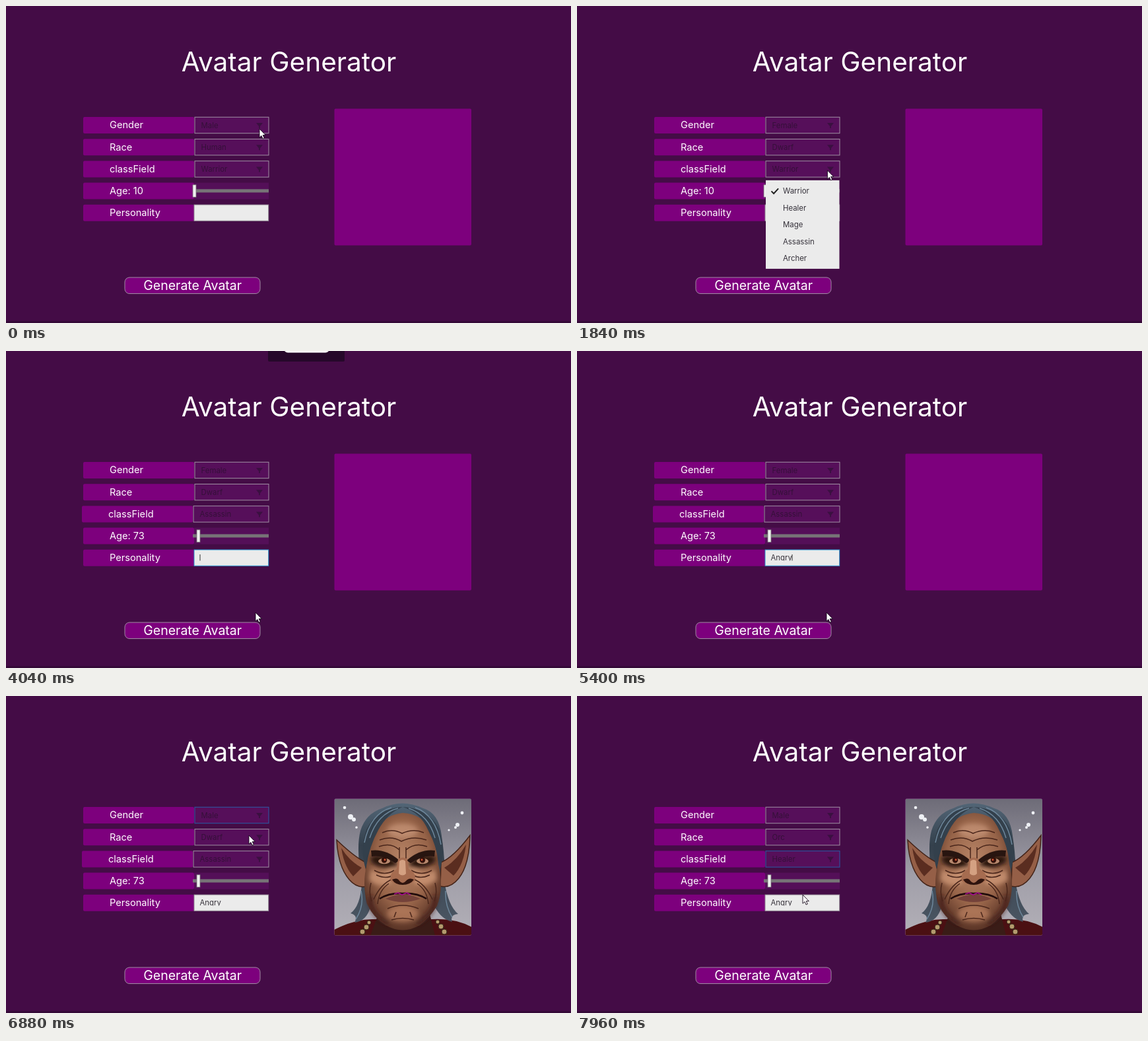
Write an HTML page that moves like this. It is 856x480 px and loops after 8000 ms.

```html
<!DOCTYPE html>
<html lang="en">
<head>
<meta charset="utf-8">
<title>Avatar Generator</title>
<style>
html, body { margin: 0; width: 100%; height: 100%; overflow: hidden; background: #440c46; }
svg { display: block; width: 856px; height: 480px; font: 14.6px Inter, sans-serif; }
.small { font-size: 11.4px; }
</style>
</head>
<body>
<svg viewBox="0 0 856 480">
  <defs>
    <linearGradient id="sky" x2="0" y2="1">
      <stop stop-color="#6d6b77"/><stop offset=".55" stop-color="#a09ea8"/><stop offset="1" stop-color="#b3b0b8"/>
    </linearGradient>
    <radialGradient id="skin" cy=".42" r=".6">
      <stop stop-color="#b98668"/><stop offset=".6" stop-color="#976449"/><stop offset="1" stop-color="#553023"/>
    </radialGradient>
    <linearGradient id="hair" x2="0" y2="1">
      <stop stop-color="#526576"/><stop offset=".35" stop-color="#34404c"/><stop offset="1" stop-color="#4a5562"/>
    </linearGradient>
    <filter id="soft"><feGaussianBlur stdDeviation=".7"/></filter>
    <filter id="blur"><feGaussianBlur stdDeviation="3"/></filter>
    <clipPath id="frame"><rect x="497.5" y="155.5" width="207.5" height="207" rx="2"/></clipPath>
    <clipPath id="line"><rect x="288" y="303" width="107" height="14.5"/></clipPath>
  </defs>
  <rect width="856" height="480" fill="#440c46"/>
  <rect y="477" width="856" height="3" fill="#350a38"/>
  <text x="428.5" y="98.5" font-size="40.6" fill="#fff" text-anchor="middle">Avatar Generator</text>
  <rect x="497.5" y="155.5" width="207.5" height="207" rx="2" fill="#7d007d"/>
  <rect x="180" y="411" width="205" height="24.5" rx="7" fill="#7d007d" stroke="#a08ba2"/>
  <text x="282.7" y="430.3" font-size="19.5" fill="#fff" text-anchor="middle">Generate Avatar</text>

  <g id="portrait" clip-path="url(#frame)">
    <rect x="497" y="155" width="209" height="208" fill="url(#sky)"/>
    <g filter="url(#soft)">
      <g fill="#eef0f4">
        <circle cx="513" cy="169" r="2.3"/><circle cx="522" cy="183" r="4"/><circle cx="527" cy="187" r="3"/>
        <circle cx="531" cy="199" r="1.8"/><circle cx="691" cy="177" r="2.4"/><circle cx="684" cy="195" r="3"/>
        <circle cx="681" cy="199" r="2"/><circle cx="671" cy="203" r="1.6"/>
      </g>
      <path d="M497 363V354Q530 337 558 338H645Q680 336 706 350V363Z" fill="#4b1013"/>
      <path d="M570 170Q600 155 632 170Q656 177 660 212Q666 250 664 280Q670 318 685 330Q672 331 676 342Q660 338 650 320H552Q546 341 528 343Q534 332 522 329Q537 318 539 284Q530 230 537 204Q545 178 570 170Z" fill="url(#hair)"/>
      <path id="earL" d="M545 252Q528 244 501 218Q503 258 520 278Q532 292 547 288Z" fill="#955f47" stroke="#432318" stroke-width="1.5"/>
      <path d="M659 252Q678 244 703 211Q702 256 686 276Q673 292 658 288Z" fill="#955f47" stroke="#432318" stroke-width="1.5"/>
      <path d="M539 260Q520 250 508 230Q512 258 526 273ZM664 260Q683 249 697 225Q693 257 678 272Z" fill="#5a2d20"/>
      <path d="M564 330H642L650 363H552Z" fill="#3a1c17"/>
      <path d="M566 198Q575 180 601 177Q630 179 638 198Q653 225 655 255Q664 290 653 318Q640 338 627 347Q601 362 575 347Q556 335 547 315Q539 285 547 253Q550 220 566 198Z" fill="url(#skin)"/>
      <path d="M601 168Q578 177 564 203Q550 228 545 262Q536 235 546 202Q562 170 601 168ZM601 168Q628 176 640 204Q654 230 658 262Q666 232 655 200Q640 170 601 168Z" fill="#33404c"/>
      <g fill="none" stroke="#6d869a" stroke-width="1.5">
        <path d="M594 170Q563 178 551 215M584 169Q552 178 543 222M610 170Q640 180 650 215M620 169Q651 180 659 225M538 295Q543 318 530 338M666 295Q665 318 676 335"/>
      </g>
      <g filter="url(#blur)">
        <path d="M553 262Q572 276 588 258L583 285Q560 290 550 278ZM614 258Q632 276 650 262L653 278Q640 290 619 285Z" fill="#d09a79" opacity=".75"/>
        <path d="M552 243Q575 235 594 254L588 259Q566 263 553 252ZM610 254Q628 235 651 243L650 252Q636 263 614 259Z" fill="#2b120c"/>
        <ellipse cx="601" cy="204" rx="23" ry="11" fill="#c89679" opacity=".7"/>
        <ellipse cx="601" cy="330" rx="24" ry="12" fill="#bb8060" opacity=".7"/>
        <path d="M553 302Q548 328 580 345M650 302Q652 328 622 345" fill="none" stroke="#40201a" stroke-width="7" opacity=".7"/>
      </g>
      <g fill="none" stroke="#4a261b" stroke-width="1.5">
        <path d="M570 207Q585 200 600 208Q618 200 633 207M566 218Q584 211 599 220Q617 211 637 218M565 228Q583 221 596 233M638 228Q620 221 606 233M596 229V246M606 229V246"/>
        <path d="M558 264Q574 273 588 264M561 271Q576 278 587 271M614 264Q630 273 645 264M616 271Q628 278 642 271"/>
        <path d="M586 277Q568 284 557 308M617 277Q635 284 646 308M580 284Q565 294 563 315M623 284Q638 294 640 315M553 283Q549 297 554 311M650 283Q654 297 649 311"/>
        <path d="M578 322Q601 312 625 322M584 339Q601 334 618 339M591 327L588 335M612 327L615 335"/>
      </g>
      <path d="M553 234Q575 231 596 249L590 253Q571 240 554 243ZM650 234Q628 231 607 249L613 253Q632 240 649 243Z" fill="#281510"/>
      <g fill="#b7886d"><ellipse cx="573" cy="250" rx="9" ry="4.3"/><ellipse cx="631" cy="250" rx="9" ry="4.3"/></g>
      <g fill="#341009"><circle cx="573" cy="248.5" r="4.2"/><circle cx="631" cy="248.5" r="4.2"/></g>
      <g fill="#d85938"><circle cx="574" cy="248" r="1.4"/><circle cx="630" cy="248" r="1.4"/></g>
      <path d="M594 247Q601 242 608 247L610 262Q623 268 619 280Q611 286 601 285Q590 286 583 280Q580 268 592 262Z" fill="#a66c50"/>
      <path d="M596 250Q601 246 605 250L606 269Q601 274 595 269Z" fill="#d4a182"/>
      <path d="M585 278Q593 274 596 280Q601 286 606 280Q611 274 618 278Q612 286 601 286Q590 286 585 278Z" fill="#2f140e"/>
      <path d="M575 307Q601 294 628 307Q601 317 575 307Z" fill="#74423a"/>
      <path d="M566 307Q580 298 601 299Q623 298 637 307" fill="none" stroke="#210c0b" stroke-width="2.6"/>
      <path d="M588 300L594 298 600 301 607 298 613 301" fill="none" stroke="#a20d8d" stroke-width="1.8"/>
      <g fill="#b49a6d" stroke="#352819">
        <circle cx="550" cy="343" r="3"/><circle cx="546" cy="350" r="4"/><circle cx="540" cy="357" r="4"/>
        <circle cx="654" cy="342" r="3"/><circle cx="659" cy="349" r="4"/><circle cx="664" cy="357" r="4"/>
      </g>
    </g>
  </g>
  <g id="form"></g>
  <g id="overlay">
    <rect x="397" y="-34" width="116" height="50" rx="2" fill="#26082a"/>
    <rect x="421" y="-22" width="69" height="24.5" rx="6" fill="#fff"/>
  </g>
  <path id="cursor" d="M0 0V13.2L3 10.5 5.1 15 7.3 14 5.2 9.6H9.3Z" fill="#fff" stroke="#16081a" stroke-width=".9"/>
</svg>
<script>
const LOOP = 8000;
const options = [
  ['Male', 'Female'],
  ['Human', 'Orc', 'Elf', 'Dwarf', 'Monster'],
  ['Warrior', 'Healer', 'Mage', 'Assassin', 'Archer'],
];
// Each list holds [time, value] pairs; a value stays until the next one.
const picks = [
  [[0, 0], [720, 1], [6800, 0]],
  [[0, 0], [1440, 3], [7280, 1]],
  [[0, 0], [2280, 3], [7640, 1]],
];
const openMenu = [[0, -1], [280, 0], [720, -1], [960, 1], [1440, -1], [1760, 2], [2280, -1],
  [6600, 0], [6800, -1], [7000, 1], [7280, -1], [7400, 2], [7640, -1]];
const focusRow = [[0, -1], [720, 0], [960, -1], [1440, 1], [1760, -1], [2280, 2], [2760, -1],
  [3440, 4], [6120, -1], [6800, 0], [7000, -1], [7280, 1], [7400, -1], [7640, 2]];
const typed = [[0, 0], [4200, 1], [4320, 2], [4440, 3], [5160, 4], [5400, 5]];
const caretOn = [[0, 0], [3440, 1], [4880, 0], [5160, 1], [6120, 0]];
const path = [[0, 384, 186], [440, 384, 186], [680, 374, 235], [760, 374, 235], [920, 383, 208],
  [1000, 383, 208], [1080, 382, 234], [1360, 366, 320], [1440, 366, 320], [1720, 380, 245],
  [1800, 380, 245], [2160, 364, 353], [2280, 364, 353], [2520, 354, 296], [2760, 286, 280],
  [2800, 286, 280], [3040, 292, 280], [3200, 292, 280], [3400, 340, 312], [3480, 340, 312],
  [3880, 378, 396], [5840, 378, 396], [6080, 340, 430], [6200, 340, 430], [6520, 378, 181],
  [6600, 378, 181], [6760, 368, 211], [7000, 368, 211], [7220, 360, 270], [7280, 360, 270],
  [7380, 372, 244], [7420, 372, 244], [7600, 344, 302], [7960, 342, 301]];

const $ = id => document.getElementById(id);
const rowY = i => 168 + i * 33.2;
const clamp = v => Math.min(1, Math.max(0, v));
const ease = v => v * v * (3 - 2 * v);
const at = (list, t) => list.filter(e => e[0] <= t).pop()[1];

const rect = (x, y, w, h, fill, more = '') =>
  `<rect x="${x}" y="${y}" width="${w}" height="${h}" fill="${fill}" ${more}/>`;
const text = (x, y, s, fill = '#fff', more = '') =>
  `<text x="${x}" y="${y}" fill="${fill}" ${more}>${s}</text>`;
const small = (x, y, s, fill, more = '') => text(x, y, s, fill, 'class="small" ' + more);

function label(i, s, shift) {
  return rect(117 - shift, rowY(i), 168, 25, '#7d007d', 'rx="2"') + text(157 - shift, rowY(i) + 17.3, s);
}

function select(i, name, pick, focused, shift) {
  const y = rowY(i), x = 286 - shift;
  return label(i, name, shift)
    + rect(x, y + .3, 398 - x, 24.4, '#560f5a', `stroke="${focused ? '#2b5aa6' : '#a08fa3'}"`)
    + small(x + 9.5, y + 16.7, options[i][pick], '#351039')
    + `<path d="M379 ${y + 9}h10l-4 5v3h-2v-3z" fill="#3a1040"/>`;
}

function menu(i, pick) {
  const top = rowY(i) + 29.5, items = options[i];
  return rect(286, top, 111.5, items.length * 25.5 + 6.5, '#ebebeb')
    + items.map((s, k) => small(312, top + 20.3 + k * 25.5, s, '#35313a')).join('')
    + `<path d="M294.5 ${top + 16.5 + pick * 25.5}l3.6 3.6 7-7.6" fill="none" stroke="#222" stroke-width="2"/>`;
}

function slider(p) {
  return label(3, 'Age: ' + Math.round(10 + 63 * p), 0)
    + rect(285, rowY(3), 113, 25, '#540f58')
    + rect(285 - 2 * p, rowY(3) + 9.8, 113 + 2 * p, 5, '#777477')
    + rect(283 + 6 * p, rowY(3) + 3.2, 5, 18.5, '#f0f0f0', 'stroke="#777" stroke-width=".8"');
}

function field(t, focused) {
  const n = at(typed, t), caretX = 293.5 + [0, 7.8, 14.5, 21.5, 25.6, 32][n];
  return label(4, 'Personality', 0)
    + rect(285, rowY(4) + .2, 112.7, 24.3, '#ebebeb', `stroke="${focused ? '#2b96cf' : '#938b95'}"`)
    + small(293.5, 317, 'Angry'.slice(0, n), '#38343c', 'clip-path="url(#line)"')
    + (at(caretOn, t) ? rect(caretX, 308, 1, 9.5, '#333') : '');
}

function moveCursor(t) {
  const k = path.findIndex(p => p[0] > t);
  const b = path[k < 0 ? path.length - 1 : k], a = path[k < 0 ? path.length - 1 : k - 1];
  const p = ease(clamp((t - a[0]) / (b[0] - a[0] || 1)));
  $('cursor').setAttribute('transform', `translate(${a[1] + (b[1] - a[1]) * p} ${a[2] + (b[2] - a[2]) * p})`);
}

function draw(now) {
  const t = now % LOOP, focus = at(focusRow, t), open = at(openMenu, t);
  const pick = picks.map(list => at(list, t));
  $('form').innerHTML = ['Gender', 'Race', 'classField']
      .map((s, i) => select(i, s, pick[i], focus === i, i === 2 && pick[2] === 3 ? 2 : 0)).join('')
    + slider(ease(clamp((t - 2800) / 240)))
    + field(t, focus === 4)
    + (open < 0 ? '' : menu(open, pick[open]));
  $('portrait').style.display = t < 6160 ? 'none' : '';
  $('overlay').style.display = t >= 4040 && t < 4200 ? '' : 'none';
  $('overlay').setAttribute('transform', `translate(0 ${-16 * clamp((t - 4080) / 120)})`);
  moveCursor(t);
}

const start = performance.now();
function tick() {
  draw(performance.now() - start);
  requestAnimationFrame(tick);
}
tick();
</script>
</body>
</html>
```
